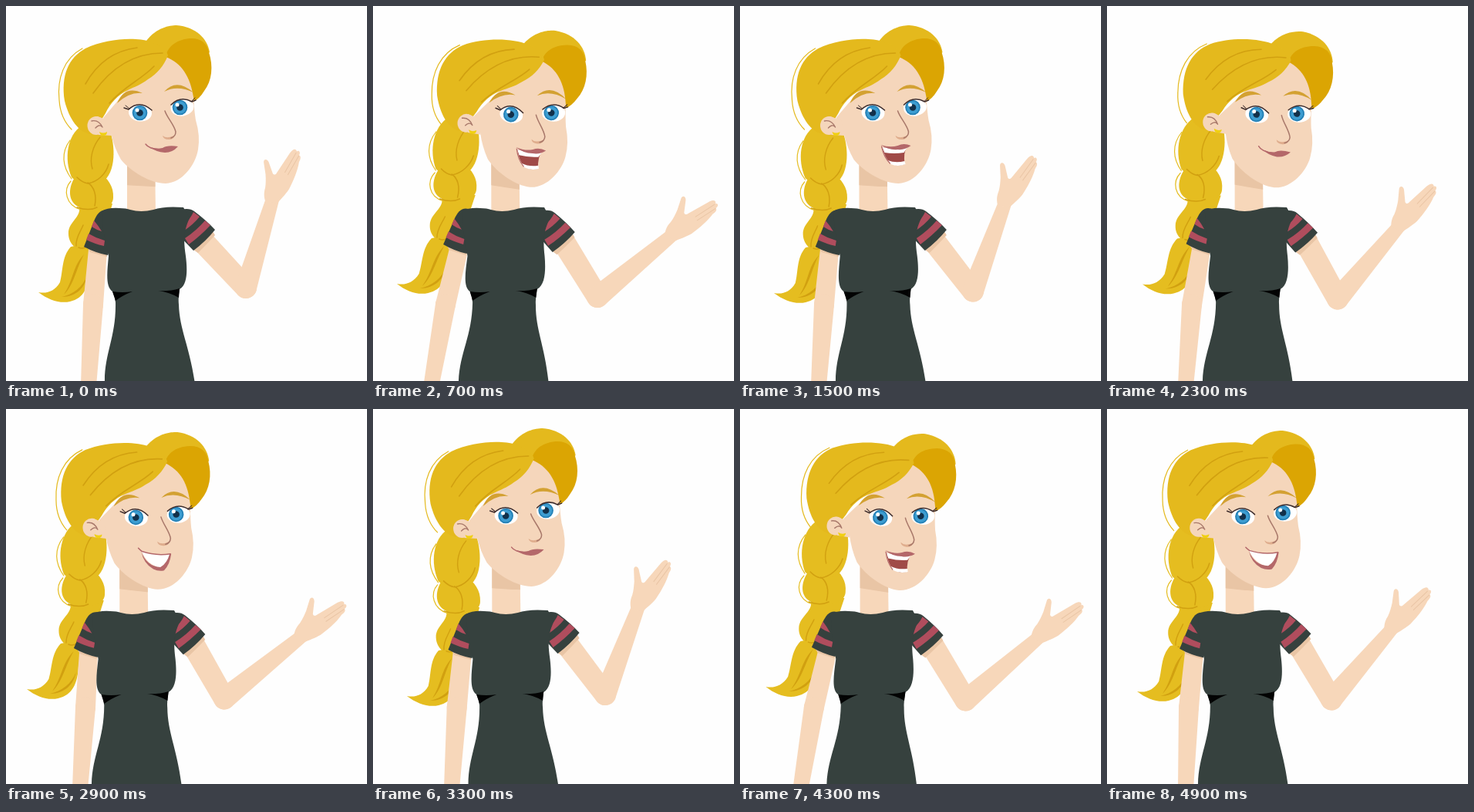
These frames come from a looping animation (468 px wide and 486 px high, 5000 ms). An HTML page with a canvas:

```html
<!DOCTYPE html>
<html lang="en">
<head>
<meta charset="utf-8">
<title>Talking presenter</title>
<style>
html, body { margin: 0; width: 100%; height: 100%; overflow: hidden; background: #fefefe; }
canvas { display: block; }
</style>
</head>
<body>
<canvas id="stage" width="468" height="486"></canvas>
<script>
const ctx = document.getElementById('stage').getContext('2d');
const LOOP = 5000, STEP = 100, CYCLE = 1825;

const C = {
  face: '#f5d6bb', arm: '#f7d7ba', shade: '#e9c5a5', shirt: '#36413e', stripe: '#b04d5d',
  hair: '#e4b91d', dark: '#dba503', braid: '#e5bd20', strand: '#d1a010', brow: '#d3a132',
  lip: '#b4686a', mouth: '#a04a47', lash: '#3d2c2c', line: '#a8786a'
};

// head x, y, tilt | shirt shift top, bottom | braid shift top, tip, rise |
// left elbow x, left wrist x | right elbow x, y | right wrist x, y | hand angle
const raised = [199, 135, 0, 0, 0, 0, 0, 0, 113, 107, 311, 365, 346, 249, -62];
const keys = [
  [0, raised],
  [180, raised],
  [475, [219.5, 140, 6.6, 3, -4, 13, 4, -10.5, 110, 102, 299, 379.5, 379, 285, -48]],
  [700, [204.5, 139.5, 5.3, -8, -17, -2, -11, -11, 94, 75.5, 291, 377, 389, 296, -35]],
  [1075, [194, 138.5, 3.3, -12, -17, -9, -15, -8, 103, 96, 283, 375.5, 384, 294, -36]],
  [1250, [201.5, 137, 2.2, -6, -10, 0, -3, -5, 106, 102, 291, 376.5, 370, 284, -45.6]],
  [1500, [197.5, 135, 0, -3, -4, -1, 2, 1, 109, 102, 302, 369.5, 344, 254, -56]],
  [CYCLE, raised]
];

// s: smirk, a: open, g: grin, o: round; one letter per 200 ms
const speech = 'soaasoaagsassggasooasaogg';

const slope = (i, c) => (keys[i + 1][1][c] - keys[i][1][c]) / (keys[i + 1][0] - keys[i][0]);

function tangent(i, c) {
  if (i === 0 || i === keys.length - 1) return 0;
  const a = slope(i - 1, c), b = slope(i, c);
  return a * b <= 0 ? 0 : 2 * a * b / (a + b);
}

function poseAt(p) {
  let i = 0;
  while (i < keys.length - 2 && p >= keys[i + 1][0]) i++;
  const [t0, from] = keys[i], [t1, to] = keys[i + 1];
  const d = t1 - t0, u = (p - t0) / d, v = 1 - u;
  return from.map((a, c) =>
    a * (1 + 2 * u) * v * v + to[c] * u * u * (3 - 2 * u) +
    d * (tangent(i, c) * u * v * v - tangent(i + 1, c) * u * u * v));
}

const paths = {};
const path = d => paths[d] || (paths[d] = new Path2D(d));

function fill(color, d) {
  ctx.fillStyle = color;
  ctx.fill(path(d));
}

function line(color, width, d) {
  ctx.strokeStyle = color;
  ctx.lineWidth = width;
  ctx.stroke(path(d));
}

function oval(color, x, y, rx, ry = rx, turn = 0) {
  ctx.fillStyle = color;
  ctx.beginPath();
  ctx.ellipse(x, y, rx, ry, turn, 0, 7);
  ctx.fill();
}

function group(draw) {
  ctx.save();
  draw();
  ctx.restore();
}

// Horizontal shear: shift by a at height y0 and by b at height y1.
function lean(a, y0, b, y1, rise = 0) {
  const k = (b - a) / (y1 - y0);
  ctx.transform(1, 0, k, 1, a - k * y0, rise);
}

function limb(color, x0, y0, r0, x1, y1, r1) {
  const dir = Math.atan2(y1 - y0, x1 - x0);
  const open = Math.acos((r0 - r1) / Math.hypot(x1 - x0, y1 - y0));
  ctx.fillStyle = color;
  ctx.beginPath();
  ctx.arc(x0, y0, r0, dir + open, dir - open + 2 * Math.PI);
  ctx.arc(x1, y1, r1, dir - open, dir + open);
  ctx.fill();
}

function drawBraid() {
  fill(C.braid, 'M84 312 C72 325 74 344 70 358 C63 370 53 373 42 371 C55 381 70 386 83 383 C101 379 108 364 108 340 L114 306 Z');
  fill(C.braid, 'M94 254 C100 274 84 276 81 292 C80 308 90 316 106 319 L125 302 L138 256 Z');
  fill(C.braid, 'M88 224 C79 240 82 257 98 262 C122 266 139 262 139 248 C140 235 132 222 120 216 Z');
  fill(C.braid, 'M98 155 C79 168 75 198 85 222 C94 231 114 231 125 228 C143 216 142 180 134 160 Z');
  line(C.braid, 1.2, 'M83 174 C71 190 73 208 85 224 M84 227 C74 238 77 258 97 264');
  line(C.strand, 1.5, 'M133 205 C130 217 119 228 106 230 C100 229 96 226 92 222 M106 229 C114 234 118 245 115 259 M92 261 C101 264 110 265 118 261');
  line(C.strand, 1.4, 'M122 170 C112 182 108 198 112 211 M100 284 C97 292 90 300 91 311 M94 313 C101 316 106 312 110 306');
  fill(C.strand, 'M101 322 C86 338 88 354 75 374 C88 362 91 340 101 322 Z M105 349 C100 364 87 374 72 377 C92 377 103 364 105 349 Z');
}

function drawArms(lx, ax, ex, ey, wx, wy, angle, shift) {
  limb(C.arm, 119 + shift, 316, 12, lx, 387, 13);
  limb(C.arm, lx, 387, 13, ax, 492, 10);
  limb(C.arm, 254 + shift, 304, 15, ex, ey, 14);
  limb(C.arm, ex, ey, 14, wx, wy, 8.5);
  group(() => {
    ctx.translate(wx, wy);
    ctx.rotate(angle * Math.PI / 180);
    fill(C.arm, 'M-8 -7 C-3 -12 2 -14 7 -15 C13 -17 18 -20 23 -23 L35 -32 C39 -35 42 -31 39 -27 L28 -15 C27 -13 28 -11 31 -11 L62 -8 C69 -7 71 -4 68 -1 C71 0 70 4 65 4 C65 7 62 8 57 8 C49 11 34 13 20 13 C11 12 5 10 -4 8 Z');
    line(C.shade, 1, 'M37 -2 L66 -1 M36 3 L64 4');
  });
}

function drawNeck(x, hx, hy, tilt) {
  const d = `M${157 + x} 195 L${157 + x} 270 L${194 + x} 270 L${193 + x} 195 Z`;
  ctx.save();
  const neck = new Path2D(d);
  ctx.fillStyle = C.arm;
  ctx.fill(neck);
  ctx.clip(neck);
  toHead(hx, hy, tilt);
  fill(C.shade, 'M120 180 H240 V235 Q175 235 120 229 Z');
  ctx.restore();
}

function drawShirt(tilt) {
  group(() => {
    const k = tilt * 0.0068;
    ctx.transform(1, k, 0, 1, 0, -k * 185);
    fill(C.shade, 'M105 312 L131 321 L131 325 L109 319 Z M268 292 L271 297 Q260 309 249 320 L243 316 Z');
    fill(C.shirt, 'M132 265 C123 263 118 269 114 279 L101 312 Q116 320 132 323 L145 280 Z');
    fill(C.shirt, 'M226 264 Q238 261 244 266 Q260 278 271 290 Q259 305 243 317 L222 295 Z');
    fill(C.stripe, 'M114 278 Q120 285 124 292 Q117 290 111 286 Z M107 295 Q117 301 128 304 L127 311 Q114 308 104 303 Z');
    fill(C.stripe, 'M231 291 Q243 283 251 273 L243 267 Q239 276 231 283 Z M237 309 Q252 298 265 284 L258 278 Q247 291 232 301 Z');
  });
  fill(C.shirt, 'M124 266 Q132 261 147 262 Q156 262 161 264 Q175 268 191 264 Q205 259 230 261 L238 275 ' +
    'C230 292 230 304 233 324 C235 340 236 361 225 367 Q223 378 224 387 C225 420 238 440 245 490 ' +
    'L128 490 C127 450 143 430 142 384 Q141 376 138 370 C129 364 131 346 133 324 L126 290 Z');
  fill('#020303', 'M138 370 Q151 372 164 370 Q151 375 142 382 Z M197 369 Q212 370 225 366 L224 378 Q212 371 197 369 Z');
}

function toHead(x, y, tilt) {
  ctx.translate(x, y);
  ctx.rotate(tilt * Math.PI / 180);
  ctx.translate(-199, -135);
}

function drawEye(x, y, iris, turn) {
  oval('#fff', x, y, 15, 11, turn);
  oval('#2480b6', iris, y, 9.8);
  oval('#3d9dd1', iris, y, 8);
  oval('#12304a', iris, y, 4.3);
  oval('#fff', iris - 3.5, y - 3.5, 2.5);
}

const mouths = {
  s() {
    fill(C.lip, 'M187 183 Q196 186 203 184 Q209 180 223 182 Q216 190 206 190 Q194 189 187 183 Z');
    line(C.lip, 1.4, 'M181 179 Q183 182 188 184 Q197 187 206 185');
  },
  a() {
    fill(C.mouth, 'M186 183 Q203 187 218 182 Q213 190 215 205 Q204 209 196 203 Q189 196 186 183 Z');
    fill('#fff', 'M186 183 Q203 187 219 182 L214 190 Q201 192 189 190 Z M193 200 Q203 204 215 201 L216 205 Q206 209 197 205 Z');
    fill(C.lip, 'M184 180 Q196 184 206 181 Q214 177 223 181 Q215 187 206 186 Q194 187 184 180 Z');
    line(C.lip, 1.2, 'M185 182 Q188 196 196 204');
  },
  g() {
    fill('#fff', 'M183 181 Q202 187 221 183 Q217 198 210 202 Q192 200 183 181 Z');
    line(C.lip, 1.5, 'M179 178 Q181 180 184 182 Q202 187 221 183');
    fill(C.lip, 'M183 182 Q191 201 209 201 Q217 196 220 183 L222 183 Q221 197 214 205 Q207 207 200 204 Q187 198 183 182 Z');
  },
  o() {
    oval(C.lip, 210.5, 186, 5.2, 7.6);
    oval('#8d3f43', 210.5, 186, 2.6, 4.6);
  }
};

function drawHead(mouth) {
  fill(C.hair, 'M182 45 C195 28 212 25 221 25 C246 27 261 42 264 60 L240 80 L205 70 Z');
  fill(C.dark, 'M207 68 C208 54 219 44 238 42 C252 41 261 48 263 60 C269 78 267 97 257 110 Q251 120 243 124 L225 90 Z');
  fill(C.face, 'M207 66 C228 74 239 92 243 118 Q244 136 246 148 Q252 168 249 186 C246 205 229 229 207 230 C188 230 162 215 149 199 Q140 183 136 165 L126 145 L160 105 Z');

  // bangs and brows
  fill(C.hair, 'M109 166 C94 163 82 147 76 123 C71 90 81 67 103 55 C130 42 168 40 186 46 Q207 53 210 64 C205 77 196 88 184 95 C175 102 166 105 158 109 C145 115 135 126 129 139 L124 147 Q107 139 109 166 Z');
  line(C.hair, 1.2, 'M99 55 C75 68 66 94 69 122 C70 138 76 151 85 160');
  line(C.strand, 1.6, 'M203 61 C170 61 139 76 113 113 M170 54 C138 58 117 76 103 101 M192 78 C176 95 153 104 134 126');
  fill(C.brow, 'M144 126 Q154 102 177 113 Q160 111 144 126 Z M205 111 Q221 93 243 112 Q222 102 205 111 Z');

  oval(C.face, 117, 155, 11.5, 12);
  fill(C.face, 'M118 143 L133 148 L137 168 L120 167 Z');
  line(C.line, 1.4, 'M111 149 Q120 147 125 157 M116 158 Q121 153 124 156');
  fill('#f0d012', 'M121 163 Q126 166 131 163 Q131 168 126 168 Q122 168 121 163 Z');

  drawEye(174, 138.5, 173.5, 0.1);
  drawEye(228.5, 131.5, 225.5, -0.15);
  line(C.lash, 1.5, 'M153 132 L159 134 Q173 121 189 135 M214 128 Q226 116 241 124 L246 122');
  line(C.lash, 1, 'M155 129 L160 133 M240 124 L245 119');

  fill('#dfad8d', 'M203 168 Q209 173 219 167 Q218 173 211 173 Q204 173 203 168 Z');
  line(C.line, 1.5, 'M206 136 C209 145 218 154 220 163 Q220 169 214 171');
  mouths[mouth]();
}

function draw(t) {
  const [hx, hy, tilt, top, foot, bt, bb, rise, lx, ax, ex, ey, wx, wy, angle] = poseAt(t % CYCLE);
  ctx.fillStyle = '#fefefe';
  ctx.fillRect(0, 0, 468, 486);
  ctx.lineCap = 'round';
  ctx.lineJoin = 'round';
  group(() => { lean(bt, 190, bb, 371, rise); drawBraid(); });
  drawArms(lx, ax, ex, ey, wx, wy, angle, top);
  drawNeck(top + 0.32 * (hx - 199 - top), hx, hy, tilt);
  group(() => { lean(top, 262, foot, 486); drawShirt(tilt); });
  group(() => { toHead(hx, hy, tilt); drawHead(speech[Math.floor(t / 200)]); });
}

const start = performance.now();
function tick() {
  const t = (performance.now() - start) % LOOP;
  draw(Math.floor(t / STEP) * STEP);
  requestAnimationFrame(tick);
}
tick();
</script>
</body>
</html>
```
